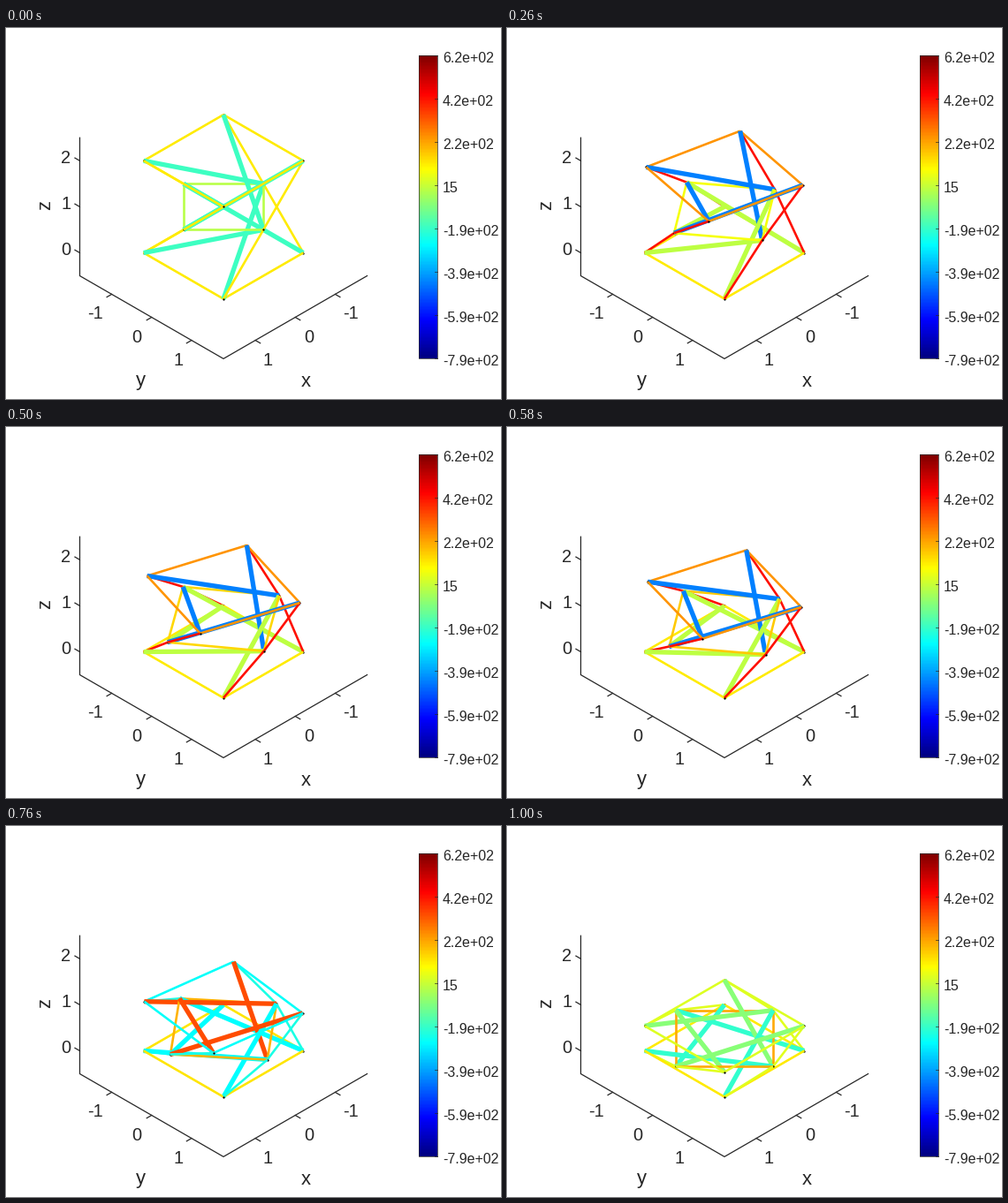
A matplotlib script that plays this animation: 560x420 px, repeating every 1.02 s.

```python
import numpy as np
import matplotlib.pyplot as plt
from matplotlib.animation import FuncAnimation

W, H, DPI = 560, 420, 100
FRAMES, STEP = 51, 20
LAST = FRAMES - 1
INK = "#262626"
PX = 72 / DPI
CX, CY, UNIT = 246, 202.4, 45.15      # screen position of (0, 0, 1) and scale
RISE, ZUNIT = UNIT / np.sqrt(3), 52.1
SWITCH = 28                           # the twist starts to unwind here

plt.rcParams["font.family"] = "Liberation Sans"


def jet(p):
    p = np.asarray(p, float)[..., None]
    return np.clip(1.5 - np.abs(4 * p - np.array([3, 2, 1])), 0, 1)


def ring(radius, start, z):
    """Four nodes as (u, v, z), with u = y - x and v = x + y."""
    a = np.radians(start + 90 * np.arange(4))
    return np.column_stack([radius * np.cos(a), radius * np.sin(a), np.full(4, z)])


def nodes(t):
    # The top sinks at two steady speeds while it twists and unwinds
    top_z = np.interp(t, [0, SWITCH, LAST], [2, 1.28, 0.54])
    wind = min(t / 24, 1)
    unwind = max(t - SWITCH, 0) / (LAST - SWITCH)
    top_turn = 17 * wind * (5 - wind ** 4) / 4 * (1 - unwind) ** 1.4

    mid_turn = 9.3 * np.sin(np.pi * (t / LAST) ** 0.8)
    mid_r = np.interp(t, [0, 25], [np.sqrt(2), 1.725])
    mid_z = top_z / 2 + 0.07 * np.sin(np.pi * min(t / 30, 1))
    return np.vstack([ring(2, 0, 0),
                      ring(mid_r, 45 + mid_turn, mid_z),
                      ring(2, top_turn, top_z)])


# Place on the colour scale at rest, when pushed down and when pulled back
FORCE = {
    "top": (.645, .73, .38),
    "base": (.645, .645, .65),
    "tie": (.645, .86, .40),
    "bar_up": (.435, .25, .80),
    "bar_low": (.435, .56, .375),
}


def tints(t):
    push = np.interp(t, [0, 4, 29, 38], [0, 1, 1, 0])
    pull = np.interp(t, [29, 38, LAST], [0, 1, 0.2])
    level = {k: r + push * (a - r) + pull * (b - r) for k, (r, a, b) in FORCE.items()}
    level["mid"] = 0.555 + 0.155 * np.sin(np.pi / 2 * t / LAST)
    return {k: jet(v) for k, v in level.items()}


def screen(q):
    q = np.atleast_2d(q)
    return np.column_stack([CX + UNIT * q[:, 0],
                            CY + RISE * q[:, 1] - ZUNIT * (q[:, 2] - 1)])


def spot(x, y, z):
    return screen([y - x, x + y, z])[0]


# Rings run right, front, left, back; middle nodes sit between them
BASE, MID, TOP = 0, 4, 8
members = []
for k in range(4):
    nxt = (k + 1) % 4
    members += [
        ("base", BASE + k, BASE + nxt),
        ("mid", MID + k, MID + nxt),
        ("top", TOP + k, TOP + nxt),
        ("tie", TOP + k, MID + k),
        ("tie", BASE + k, MID + (k + 3) % 4),
        ("bar_up", TOP + k, MID + nxt),
        ("bar_low", BASE + k, MID + (k + 2) % 4),
    ]

fig = plt.figure(figsize=(W / DPI, H / DPI), dpi=DPI, facecolor="white")
ax = fig.add_axes([0, 0, 1, 1])
ax.axis("off")


def stroke(pts, width=1.25, **kw):
    x, y = zip(*pts)
    ax.plot(x, y, color=INK, lw=width * PX, **kw)


def label(x, y, s, px=20, **kw):
    kw = {"ha": "center", "va": "center_baseline", **kw}
    ax.text(x, y, s, fontsize=px * PX, color=INK, **kw)


# Axes
L, FLOOR, CEIL = 1.8, -0.5, 2.5
stroke([spot(L, -L, CEIL), spot(L, -L, FLOOR), spot(L, L, FLOOR), spot(-L, L, FLOOR)],
       solid_joinstyle="miter")
for v in (-1, 0, 1):
    a, b, c = spot(L, v, FLOOR), spot(v, L, FLOOR), spot(L, -L, v + 1)
    stroke([a, a + (-5.5, 3.2)])
    stroke([b, b + (5.5, 3.2)])
    stroke([c, c + (-5.5, -3.2)])
    label(68, 197.5 - 52 * v, str(v + 1))
    label(148 + 47 * v, 348 + 26.5 * v, str(v))
    label(343 - 46.5 * v, 348 + 26.5 * v, str(v))
label(152, 405.5, "y", 22, va="baseline")
label(339.5, 405.5, "x", 22, va="baseline")
label(45, 201, "z", 22, va="center", rotation=90)

# Colour bar
X0, X1, Y0, Y1 = 467, 488, 31, 374
ax.imshow(jet(np.linspace(1, 0, 256))[:, None, :], extent=(X0, X1, Y1, Y0),
          aspect="auto", interpolation="nearest", zorder=1)
stroke([(X0, Y0), (X1, Y0), (X1, Y1), (X0, Y1), (X0, Y0)], 0.7, zorder=3)
marks = ["6.2e+02", "4.2e+02", "2.2e+02", "15", "-1.9e+02", "-3.9e+02", "-5.9e+02", "-7.9e+02"]
for y, s in zip(np.linspace(Y0, Y1, len(marks)), marks):
    stroke([(X1 - 3.5, y), (X1, y)], 0.7, zorder=3)
    label(494, y + 1.7, s, 16, ha="left")
ax.set_xlim(0, W)
ax.set_ylim(H, 0)

lines = [ax.plot([], [], lw=(5.3 if kind.startswith("bar") else 2.6) * PX,
                 solid_capstyle="butt")[0] for kind, _, _ in members]
dots = [ax.plot([], [], "o", color="black", ms=2.3 * PX, mew=0)[0] for _ in range(12)]


def update(t):
    q = nodes(t)
    xy = screen(q)
    depth = 10 + q[:, 1] + q[:, 2]
    tint = tints(t)
    for line, (kind, i, j) in zip(lines, members):
        line.set_data(xy[[i, j], 0], xy[[i, j], 1])
        line.set_color(tint[kind])
        line.set_zorder((depth[i] + depth[j]) / 2)
    for dot, p, d in zip(dots, xy, depth):
        dot.set_data([p[0]], [p[1]])
        dot.set_zorder(d + 0.01)
    return lines + dots


anim = FuncAnimation(fig, update, frames=FRAMES, interval=STEP, repeat=True,
                     repeat_delay=0, init_func=lambda: update(0), blit=False)
plt.show()
```
